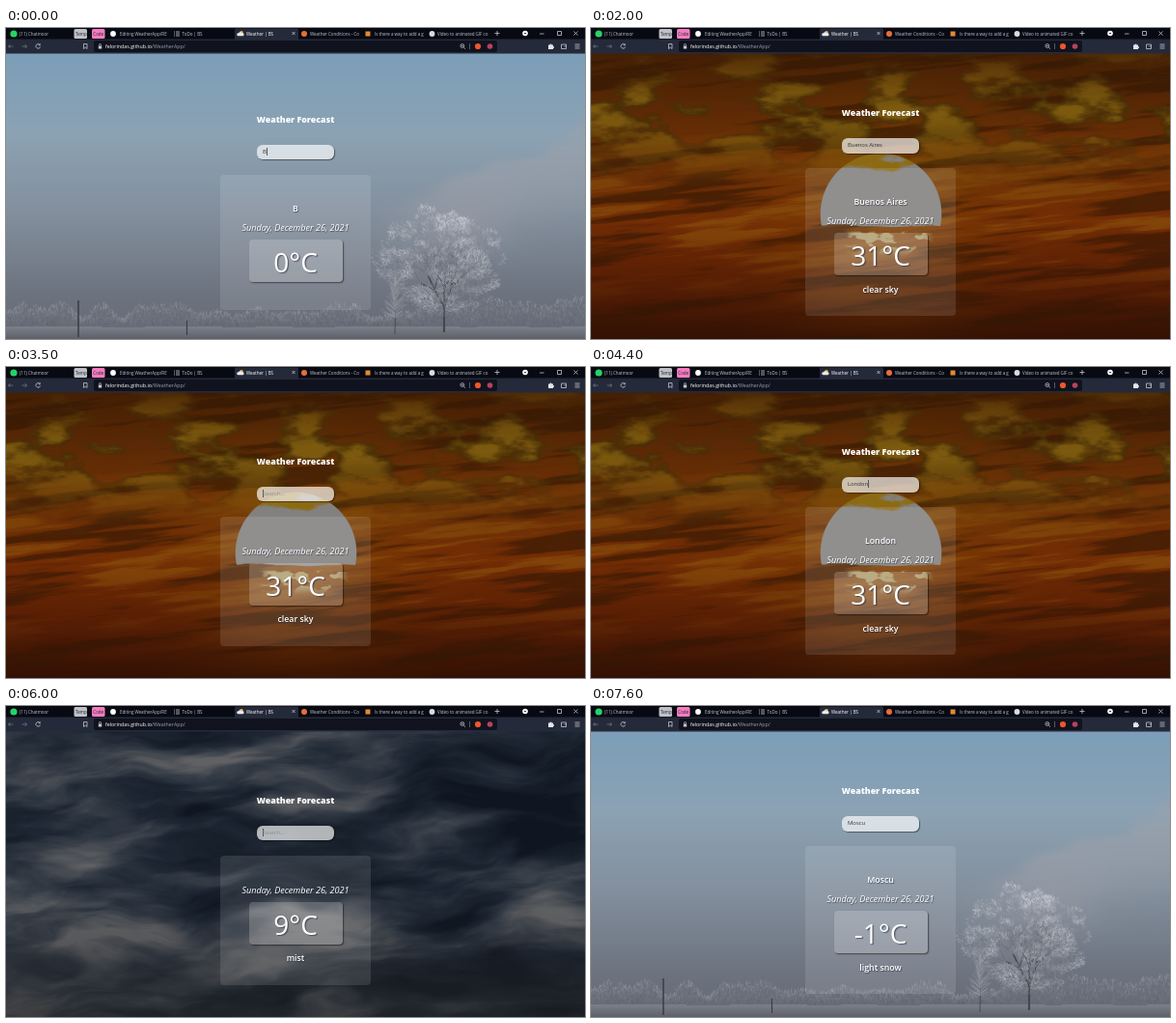
An HTML page with a canvas for the animation above (8000 ms loop, 600 px wide and 322 px high).

```html
<!DOCTYPE html>
<html lang="en">
<head>
<meta charset="utf-8">
<title>Weather Forecast</title>
<style>
  html, body { margin: 0; width: 100%; height: 100%; overflow: hidden; background: #10131f; }
  body { font-family: "Open Sans", "Noto Sans", sans-serif; }
  #stage { position: relative; width: 600px; height: 322px; overflow: hidden; }
  canvas, #chrome { position: absolute; left: 0; top: 0; }
  canvas { visibility: hidden; }
  #card { position: absolute; left: 222px; width: 156px; text-align: center; color: #fff; }
  #title { height: 20px; line-height: 20px; font-size: 8.8px; font-weight: 800; }
  #box {
    box-sizing: border-box; width: 80px; height: 15.5px; margin: 16px 0 15.5px 38px; padding-left: 6px;
    line-height: 15.5px; font-size: 5.9px; text-align: left; color: #333;
    background: rgba(255, 255, 255, .67); border-radius: 6px; box-shadow: 1px 1px 1px rgba(0, 0, 0, .45);
  }
  #typed { white-space: pre; }
  #typed.selected { color: #fff; background: #2f7ed8; }
  #caret { display: inline-block; width: 1px; height: 8px; margin-right: -1px; vertical-align: -2px; background: #555; }
  #hint { color: #8d8d8d; }
  #panel { padding: 26px 0 20.5px; border-radius: 4px; background: rgba(255, 255, 255, .11); }
  #place, #date { height: 19px; line-height: 19px; white-space: nowrap; text-shadow: .7px .7px 1px rgba(30, 35, 55, .6); }
  #place, #sky { font-size: 8.8px; font-weight: 600; }
  #date { font-size: 9.1px; font-style: italic; }
  #temp {
    width: 97px; height: 44px; margin: 3px auto 8.5px; line-height: 46px; font-size: 28px;
    background: rgba(255, 255, 255, .19); border-radius: 4px;
    box-shadow: 1px 1px 1.5px rgba(0, 0, 0, .5); text-shadow: 1.3px 1.3px 1px rgba(40, 42, 60, .6);
  }
  #sky { height: 13px; line-height: 13px; text-shadow: .7px .7px 1px rgba(30, 35, 55, .6); }
  #chrome { font-family: "Open Sans", "Noto Sans", sans-serif; font-size: 4.5px; fill: #c3c6ce; }
  #chrome .line { fill: none; stroke: #c3c6ce; stroke-width: .8; }
</style>
</head>
<body>
<div id="stage">
  <canvas id="snow" width="600" height="322"></canvas>
  <canvas id="sunset" width="600" height="322"></canvas>
  <canvas id="storm" width="600" height="322"></canvas>

  <div id="card">
    <div id="title">Weather Forecast</div>
    <div id="box"><span id="typed"></span><i id="caret"></i><span id="hint">Search...</span></div>
    <div id="panel">
      <div id="place"></div>
      <div id="date">Sunday, December 26, 2021</div>
      <div id="temp"></div>
      <div id="sky"></div>
    </div>
  </div>

  <svg id="chrome" width="600" height="27" viewBox="0 0 600 27">
    <rect width="600" height="12" fill="#080a13"/>
    <rect y="11.5" width="600" height="15" fill="#252a3a"/>
    <path d="M237 12V2q0-1.5 1.5-1.5h63q1.5 0 1.5 1.5v10z" fill="#252a3a"/>
    <rect x="91" y="13" width="418" height="12" rx="2" fill="#10131e"/>

    <circle cx="8" cy="6" r="3.6" fill="#25d366"/>
    <text x="14" y="7.6">(11) Chatmoor</text>
    <rect x="70.5" y="1" width="13.5" height="10" rx="1.5" fill="#bfc1c6"/>
    <text x="72" y="7.6" fill="#22242c">Temp</text>
    <rect x="89" y="1" width="13.5" height="10" rx="1.5" fill="#f57cc0"/>
    <text x="90.3" y="7.6" fill="#22242c">Code</text>
    <circle cx="111" cy="6" r="2.9" fill="#fff"/>
    <text x="118" y="7.6">Editing WeatherApp/RE</text>
    <path class="line" d="M174 4h1m1 0h4m-6 2h1m1 0h4m-6 2h1m1 0h4"/>
    <text x="182.5" y="7.6">ToDo | BS</text>
    <circle cx="244" cy="5" r="1.9" fill="#f2b632"/>
    <path d="M240.5 8.3a1.5 1.5 0 0 1 .5-3 2 2 0 0 1 3.5 0 1.5 1.5 0 0 1 1 3z" fill="#e8ebf0"/>
    <text x="249" y="7.6" fill="#fff">Weather | BS</text>
    <circle cx="309" cy="6" r="3" fill="#e96e38"/>
    <text x="315" y="7.6">Weather Conditions - Co</text>
    <rect x="372.5" y="3.5" width="5" height="5" fill="#e58a30"/>
    <text x="382" y="7.6">Is there a way to add a g</text>
    <circle cx="441.5" cy="6" r="2.9" fill="#d9dbe0"/>
    <text x="447" y="7.6">Video to animated GIF co</text>
    <path class="line" d="M296.5 4l3 3m0-3l-3 3M506.500 5.500h5m-2.500-2.500v5"/>
    <circle cx="538" cy="5.5" r="2.8" fill="#fff"/>
    <path d="M536.8 5h2.400l-1.200 1.400z" fill="#080a13"/>
    <path class="line" d="M553 6h4.500M571.500 3.500h4v4h-4zM588.500 3.500l4 4m0-4l-4 4"/>

    <path class="line" d="M35 17.300a2.300 2.300 0 1 0 .5 2.200m-.2-3.200v1.500h-1.600M80.500 16.500h3.500v5l-1.700-1.400-1.800 1.400z"/>
    <path class="line" d="M7.500 19h-5m2-2l-2 2 2 2M16.500 19h5m-2-2l2 2-2 2" opacity=".45"/>
    <path d="M95.800 18.500h3.400v3h-3.400z"/>
    <path class="line" d="M96.500 18.500v-1a1 1 0 0 1 2 0v1"/>
    <text x="103" y="21" font-size="5.3" fill="#9a9eaa"><tspan fill="#fff">felorindas.github.io</tspan>/WeatherApp/</text>
    <circle class="line" cx="472.800" cy="18.500" r="1.900"/>
    <path class="line" d="M474.300 20l1.700 1.700M472 18.500h1.600"/>
    <path class="line" d="M480.500 16v6" opacity=".5"/>
    <circle cx="489" cy="19" r="3.100" fill="#f0562b"/>
    <circle cx="501.500" cy="19" r="2.800" fill="#b8425f"/>
    <path d="M562 17.500h1.500a1 1 0 0 1 2 0h1.500v1.500a1 1 0 0 1 0 2v1h-5z" fill="#e3e5ea"/>
    <path class="line" d="M575.500 17h5v4.500h-5zM578.500 19h2M589.500 17h5m-5 2h5m-5 2h5"/>
  </svg>
</div>

<script>
const $ = id => document.getElementById(id);
const LOOP = 8000;

// ---- Noise and colour helpers ----
const hash = (x, y) => {
  let n = Math.imul(x, 374761393) ^ Math.imul(y, 668265263);
  n = Math.imul(n ^ (n >>> 13), 1274126177);
  return ((n ^ (n >>> 16)) >>> 0) / 2 ** 32;
};
const lerp = (a, b, t) => a + (b - a) * t;
const mix = (a, b, t) => a.map((v, i) => lerp(v, b[i], t));
const smooth = (lo, hi, v) => {
  const t = Math.min(1, Math.max(0, (v - lo) / (hi - lo)));
  return t * t * (3 - 2 * t);
};
const bump = (v, center, spread) => Math.exp(-(((v - center) / spread) ** 2));
const noise = (x, y) => {
  const i = Math.floor(x), j = Math.floor(y);
  const u = smooth(0, 1, x - i), v = smooth(0, 1, y - j);
  return lerp(lerp(hash(i, j), hash(i + 1, j), u), lerp(hash(i, j + 1), hash(i + 1, j + 1), u), v);
};
const fbm = (x, y, octaves = 5) => {
  let sum = 0, amp = .5;
  for (let k = 0; k < octaves; k++, amp /= 2) {
    sum += amp * noise(x, y);
    x = x * 2 + 17;
    y = y * 2 + 31;
  }
  return sum / (1 - 2 * amp);
};
const ramp = (stops, v) => {
  let k = 1;
  while (k < stops.length - 1 && v > stops[k][0]) k++;
  const [a, from] = stops[k - 1], [b, to] = stops[k];
  return mix(from, to, Math.min(1, Math.max(0, (v - a) / (b - a))));
};
let seed = 0;
const rand = () => hash(++seed, 77);

function paint(id, shade) {
  const g = $(id).getContext('2d'), img = g.createImageData(600, 322);
  for (let y = 26; y < 322; y++)
    for (let x = 0; x < 600; x++)
      img.data.set([...shade(x, y), 255], (y * 600 + x) * 4);
  g.putImageData(img, 0, 0);
  return g;
}

// ---- Storm clouds ----
const stormTones = [[.25, [15, 22, 33]], [.45, [29, 38, 50]], [.6, [53, 60, 70]], [.8, [96, 97, 99]]];
paint('storm', (x, y) => {
  const drift = fbm(x / 90, y / 40 + 7, 3);
  const n = fbm(x / 120 + drift * .5, y / 30 + drift * 1.3 + x / 400, 6);
  const light = .09 * bump(x, 90, 150) * bump(y, 150, 110)
    + .17 * bump(x, 300, 45) * bump(y, 228, 20)
    - .07 * smooth(270, 400, x) * (1 - smooth(180, 260, y));
  return mix(ramp(stormTones, n + light), [38, 37, 38], .45 * smooth(190, 322, y));
});

// ---- Sunset ----
const duskTones = [[26, [68, 31, 4]], [120, [106, 47, 5]], [200, [114, 44, 4]], [260, [88, 30, 4]], [322, [50, 16, 4]]];
paint('sunset', (x, y) => {
  const cloud = fbm(x / 52, y / 21 + 3, 6), streak = fbm(x / 120, y / 10 + x / 90, 5);
  const d = Math.hypot(x - 300, y - 192);
  let c = ramp(duskTones, y);
  c = mix(c, [140, 88, 6], .45 * Math.exp(-((d / 95) ** 2)));
  c = mix(c, [48, 22, 4], .6 * (1 - smooth(.32, .5, streak)));
  c = mix(c, [140, 84, 12], .6 * smooth(.55, .7, streak) * bump(y, 195, 60));
  const puff = mix([70, 46, 6], [128, 97, 16], smooth(.48, .68, cloud));
  c = mix(c, puff, .85 * smooth(.43, .52, cloud) * bump(y, 85, 50));
  const low = 204 + (cloud - .5) * 8, high = 136 + (cloud - .5) * 45;
  const disc = (1 - smooth(62, 63.5, d)) * (1 - smooth(low, low + 1.5, y));
  c = mix(c, mix([140, 106, 20], [130, 129, 127], smooth(high - 2, high + 2, y)), disc);
  const glint = smooth(.45, .53, fbm(x / 17, y / 8, 3)) * (1 - smooth(34, 48, Math.abs(x - 308)));
  return mix(c, [158, 138, 84], glint * smooth(209, 212, y) * (1 - smooth(224, 238, y)));
});

// ---- Snowy field ----
const winterTones = [[26, [124, 158, 184]], [110, [139, 162, 179]], [190, [131, 143, 157]], [285, [106, 112, 124]], [307, [103, 109, 120]]];
const groundTones = [[307, [126, 132, 142]], [322, [92, 95, 103]]];
const field = paint('snow', (x, y) => {
  if (y > 308 + 2 * noise(x / 40, 5)) return ramp(groundTones, y);
  const top = 175 - (x - 400) * .42 + (fbm(x / 60, y / 40, 4) - .5) * 50;
  const w = .48 * smooth(360, 480, x) * smooth(top, top + 25, y) * (1 - smooth(top + 30, top + 130, y));
  return mix(ramp(winterTones, y), [160, 161, 170], w);
});

function stroke(g, x, y, dx, dy, width, color) {
  g.lineWidth = width;
  g.strokeStyle = color;
  g.beginPath();
  g.moveTo(x, y);
  g.lineTo(x + dx, y + dy);
  g.stroke();
}
const frost = (v, alpha) => `rgba(${v | 0},${v + 4 | 0},${v + 12 | 0},${alpha})`;

function branch(g, x, y, len, angle, depth) {
  const dx = Math.cos(angle) * len, dy = Math.sin(angle) * len;
  stroke(g, x, y, dx, dy, .4 + depth * .35, depth > 2 ? 'rgb(70,70,78)' : frost(105, .6));
  if (!depth) return;
  for (const turn of [-.5, .05, .5])
    branch(g, x + dx, y + dy, len * (.68 + rand() * .16), angle + turn + (rand() - .5) * .4, depth - 1);
}

// hedge: short twigs piled up to an uneven height
for (let i = 0; i < 4200; i++) {
  const x = rand() * 600, up = rand();
  const h = up * (5 + 20 * noise(x / 20, 9) + 9 * smooth(370, 430, x));
  stroke(field, x, 309 - h, (rand() - .5) * 3, -1 - rand() * 3, .7, frost(78 + 50 * up + rand() * 45, .5));
}
// tree: dark limbs under a frosted crown
branch(field, 454, 315, 26, -Math.PI / 2, 5);
for (let i = 0; i < 8500; i++) {
  const a = rand() * Math.PI * 2, r = Math.sqrt(rand()) * (.84 + .28 * noise(Math.cos(a) * 4 + 9, Math.sin(a) * 4 + 9));
  const x = 451 + Math.cos(a) * r * 64, y = 240 + Math.sin(a) * r * 53;
  const n = fbm(x / 11, y / 8, 3);
  if (n < .3 + .2 * rand()) continue;
  const dir = Math.atan2(y - 290, x - 453) + (rand() - .5) * 2, len = 1 + rand() * 3;
  const tone = 85 + n * 130 - (y - 241) * .4 + (rand() - .5) * 45;
  stroke(field, x, y, Math.cos(dir) * len, Math.sin(dir) * len, .7, frost(tone, .6));
}
// sapling and fence posts
stroke(field, 403, 317, 1, -50, .9, 'rgb(72,72,80)');
for (let i = 0; i < 160; i++) {
  const h = rand();
  stroke(field, 403, 300 - h * 36, (rand() - .5) * 28 * (1.1 - h), -3 - rand() * 7, .6, frost(120 + rand() * 45, .55));
}
stroke(field, 75, 320, 0, -38, 1.3, 'rgb(52,52,58)');
stroke(field, 187.5, 318, 0, -15, 1.1, 'rgb(58,58,64)');

// ---- Timeline ----
const typing = [];
const type = (word, first, times) => times.forEach((t, i) => typing.push([t, word.slice(0, first + i)]));
type('Buenos Aires', 1, [0, 100, 200, 300, 500, 700, 1000, 1100, 1200, 1300, 1400, 1500]);
type('London', 0, [3500, 3800, 3900, 4000, 4100, 4300, 4400]);
type('Moscu', 0, [6000, 6500, 6800, 6900, 7000, 7100]);

const reports = [
  [0, 'snow', '0°C', ''],
  [2000, 'sunset', '31°C', 'clear sky'],
  [4700, 'storm', '9°C', 'mist'],
  [7600, 'snow', '-1°C', 'light snow'],
];
const selections = [[2900, 3500], [5500, 6000]];
const latest = (list, t) => list.filter(e => e[0] <= t).pop();
const setText = (id, text) => { if ($(id).textContent !== text) $(id).textContent = text; };

function draw(now) {
  const t = now % LOOP;
  const [keyTime, text] = latest(typing, t);
  const [, scene, temp, sky] = latest(reports, t);
  const selected = selections.some(([from, to]) => t >= from && t < to);

  for (const id of ['snow', 'sunset', 'storm']) $(id).style.visibility = id === scene ? 'visible' : 'hidden';
  setText('typed', text);
  setText('place', text.trim());
  setText('temp', temp);
  setText('sky', sky);
  $('typed').className = selected ? 'selected' : '';
  $('caret').style.visibility = !selected && (t - keyTime) % 1000 < 500 ? 'visible' : 'hidden';
  $('hint').style.display = text ? 'none' : '';
  $('place').style.display = text ? '' : 'none';
  $('sky').style.display = sky ? '' : 'none';
  // the card stays centred as its lines come and go
  $('card').style.top = 78 + (text ? 0 : 9.5) + (sky ? 0 : 6.5) + 'px';
}

const start = performance.now();
function tick() {
  draw(performance.now() - start);
  requestAnimationFrame(tick);
}
tick();
</script>
</body>
</html>
```
